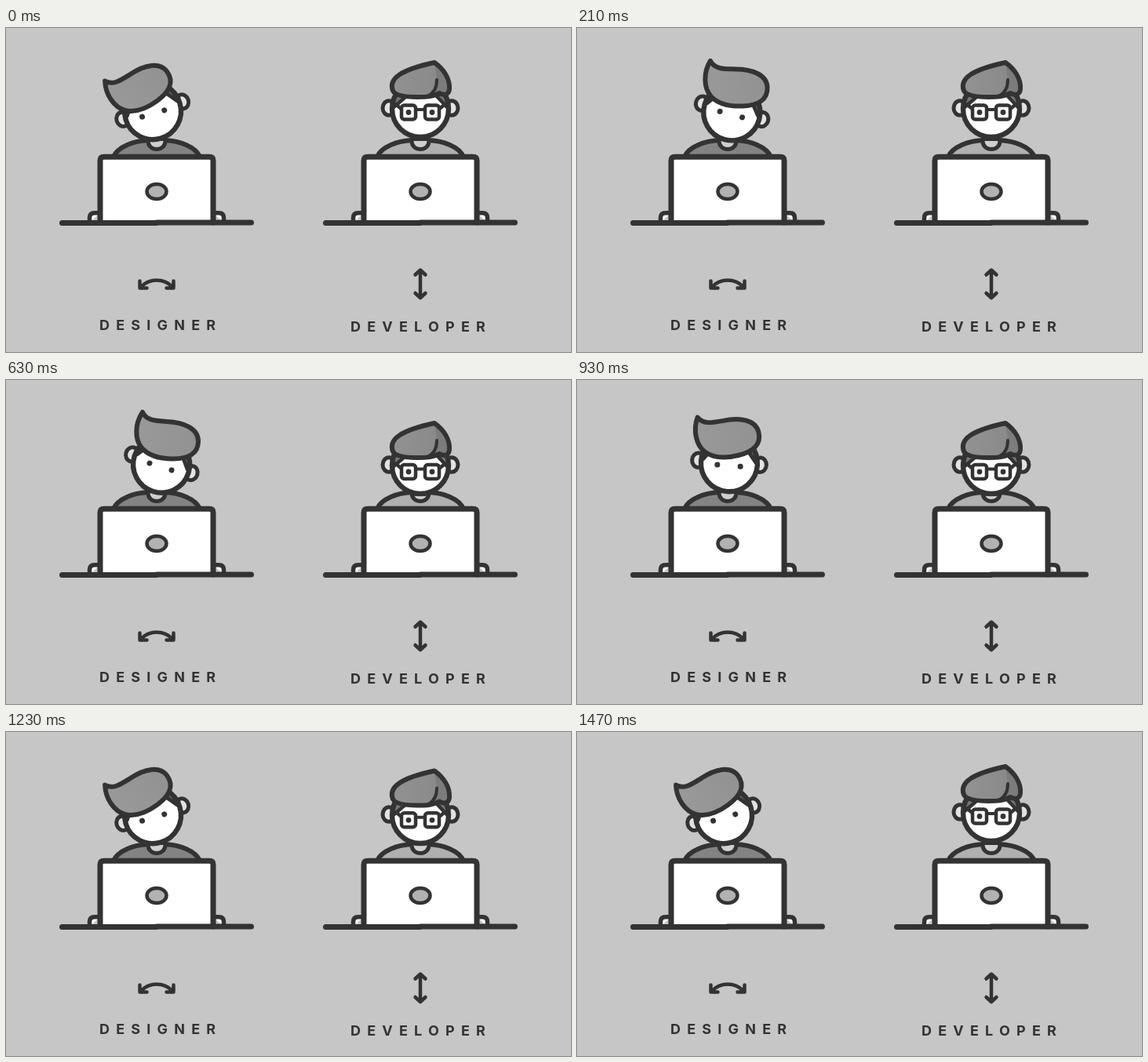
These frames come from a looping animation (720x413 px, 1.8 s). An HTML page with a canvas:

```html
<!DOCTYPE html>
<html lang="en">
<head>
<meta charset="utf-8">
<title>Designer and developer</title>
<style>
  html, body { margin: 0; width: 100%; height: 100%; overflow: hidden; background: #c6c6c6; }
  canvas { position: absolute; left: 0; top: 0; }
  .label {
    position: absolute; color: #333; white-space: nowrap;
    font: 700 18px/18px Inter, "Open Sans", sans-serif; letter-spacing: 8.2px;
  }
</style>
</head>
<body>
<canvas id="stage" width="720" height="413"></canvas>
<div class="label" style="left:119px;top:369.5px">DESIGNER</div>
<div class="label" style="left:439px;top:372px">DEVELOPER</div>
<script>
const ctx = document.getElementById('stage').getContext('2d');
const LOOP = 1800, STEP = 30;
const INK = '#333', WHITE = '#fff', BG = '#c6c6c6';
const rad = deg => deg * Math.PI / 180;
const mix = (a, b, k) => a + (b - a) * k;

// cubic-bezier(.25, .1, .25, 1)
function ease(x) {
  if (x <= 0) return 0;
  if (x >= 1) return 1;
  const bez = (a, b, u) => 3 * a * u * (1 - u) ** 2 + 3 * b * u * u * (1 - u) + u ** 3;
  let lo = 0, hi = 1;
  for (let i = 0; i < 24; i++) {
    const mid = (lo + hi) / 2;
    if (bez(.25, .25, mid) < x) lo = mid; else hi = mid;
  }
  return bez(.1, 1, lo);
}

function paint(path, fill, width, stroke = INK) {
  if (fill) { ctx.fillStyle = fill; ctx.fill(path); }
  if (width) { ctx.lineWidth = width; ctx.strokeStyle = stroke; ctx.stroke(path); }
}
const draw = (d, fill, width) => paint(new Path2D(d), fill, width);

function oval(x, y, rx, ry, fill, width) {
  const p = new Path2D();
  p.ellipse(x, y, rx, ry, 0, 0, 7);
  paint(p, fill, width);
}

function box(x, y, w, h, r, fill, width) {
  const p = new Path2D();
  p.roundRect(x, y, w, h, r);
  paint(p, fill, width);
}

function at(x, y, angle, body) {
  ctx.save();
  ctx.translate(x, y);
  ctx.rotate(rad(angle));
  body();
  ctx.restore();
}

function blend(x0, x1, from, to) {
  const g = ctx.createLinearGradient(x0, 0, x1, 0);
  g.addColorStop(0, from);
  g.addColorStop(1, to);
  return g;
}

function torso(fill) {
  draw('M137 164 C143 151 163 144 181 143 H203 C221 144 241 151 247 164', fill, 6);
  draw('M181 144 C181 158 203 158 203 144', '#cfcfcf', 5);
}

function laptop() {
  draw('M106.5 248 V242 Q106.5 235.8 113 235.8 H120', WHITE, 5.5);
  draw('M277.5 248 V242 Q277.5 235.8 271 235.8 H264', WHITE, 5.5);
  draw('M120 248 V169 Q120 164.3 125 164.3 H259 Q264 164.3 264 169 V248', WHITE, 7);
  oval(192, 208.5, 12.5, 9.5, '#b2b2b2', 4.5);
  draw('M71.5 248.4 H192 M192 248 H312.5', null, 7);
}

// Face disc with ears, and side hair clipped to the disc
function face(x, y, earGap, sides) {
  for (const s of [-1, 1]) oval(x + s * earGap, y - 1, 8, 9.2, '#e2e2e2', 5);
  const disc = new Path2D();
  disc.arc(x, y, 36, 0, 7);
  paint(disc, WHITE);
  ctx.save();
  ctx.clip(disc);
  sides();
  ctx.restore();
  paint(disc, null, 6.4);
}

function designerHead(k) {
  at(190, 125, mix(-16.5, 17.5, k), () => {
    face(2.5, -19, 39.5, () => {
      draw('M-20 -37 L-31 -22 L-42 -28 L-34 -52 Z', '#777', 5);
      draw('M25 -37 L36 -23 L46 -28 L40 -52 Z', '#777', 5);
    });
    oval(-12.4, -16, 3.5, 3.5, INK);
    oval(17, -16, 3.5, 3.5, INK);
  });
  at(191, 128, mix(-36, 0, k), () => {
    ctx.translate(-190, -128);
    draw('M173 41 C178 52 190 52 204 53 C226 54 244 62 244 78 ' +
      'C244 94 231 100.5 212 100.5 C191 100.5 179 95 171.5 86 C163 75 163 56 173 41 Z',
      blend(165, 243, '#999', '#929292'), 6);
  });
}

function developerHead(k) {
  face(528, 103 + 6 * k, 40, () => {
    ctx.translate(0, 9 * k);
    draw('M488 78 L508 89 L494 101 Z', '#777', 4.5);
    draw('M568 78 L548 86 L562 101 Z', '#777', 4.5);
  });

  at(0, 9.5 * k, 0, () => {
    for (const s of [-1, 1]) {
      const x = 528 + s * 15;
      box(x - 9, 98.5, 18, 18, 3.5, WHITE, 4.5);
      oval(x, 107.5, 3.4, 3.4, INK);
      ctx.beginPath();
      ctx.moveTo(528 + s * 25, 102.5);
      ctx.lineTo(528 + s * 31, 97.5);
      ctx.stroke();
    }
    draw('M523 104 H533', null, 4);
  });

  at(0, 11 * k, 0, () => {
    const hair = 'M546 44 C557 52 566 64 565 78 C564 86 558 86 552 83 ' +
      'C544 88 534 88 524 88 C508 88 496 86 493 80 C487 64 504 53 546 44 Z';
    draw(hair, blend(492, 550, '#929292', '#8a8a8a'));
    draw('M546 44 C557 52 566 64 565 78 C564 86 558 86 552 83 L537 87 ' +
      'C546 83 549 76 549 66 Z', '#7c7c7c');
    draw(hair, null, 6);
    draw('M549 66 C549 76 546 83 537 87', null, 4);
  });
}

function arrows() {
  draw('M172 330 A28 28 0 0 1 212 330 M170.5 322.5 V331.5 H179.5 ' +
    'M213.5 322.5 V331.5 H204.5', null, 4.5);
  draw('M528 309 V343.5 M521.5 314.5 L528 308.5 L534.5 314.5 ' +
    'M521.5 338 L528 344 L534.5 338', null, 4.5);
}

function swing(t, go, back, span) {
  return ease((t - go) / span) - ease((t - back) / span);
}

function render(t) {
  ctx.fillStyle = BG;
  ctx.fillRect(0, 0, 720, 413);
  ctx.lineCap = ctx.lineJoin = 'round';

  torso('#838383');
  designerHead(swing(t, 10, 858, 300));
  laptop();

  at(336, 0, 0, () => torso('#b0b0b0'));
  developerHead(swing(t, 260, 1141, 305));
  at(336, 0, 0, laptop);

  arrows();
}

const start = performance.now();
function tick() {
  const t = (performance.now() - start) % LOOP;
  render(Math.floor(t / STEP) * STEP);
  requestAnimationFrame(tick);
}
tick();
</script>
</body>
</html>
```
